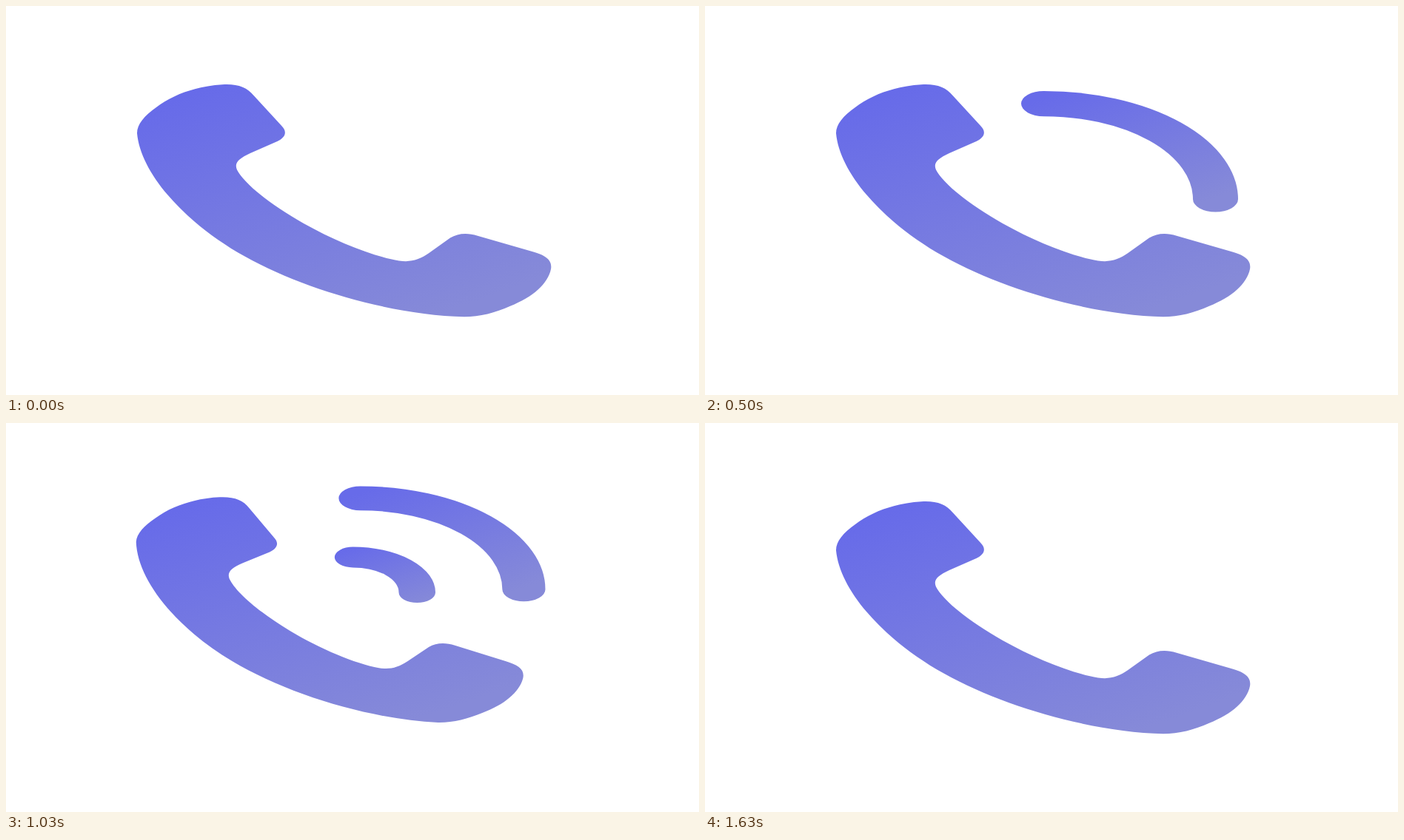
An HTML page that plays this animation: 936x526 px, repeating every 1660 ms.

```html
<!DOCTYPE html>
<html lang="en">
<head>
<meta charset="utf-8">
<title>Ringing phone</title>
<style>
  html, body { margin: 0; width: 100%; height: 100%; overflow: hidden; background: #fff; }
  svg { display: block; width: 100%; height: 100%; }
  .wave { fill: none; stroke-linecap: round; }
</style>
</head>
<body>
<!-- A square drawing, squashed to the stage -->
<svg viewBox="0 0 936 936" preserveAspectRatio="none">
  <defs>
    <linearGradient id="ink" x1=".05" y1=".09" x2=".65" y2="1.04">
      <stop offset="0" stop-color="#676be9"/>
      <stop offset="1" stop-color="#868ad8"/>
    </linearGradient>
    <linearGradient id="outerInk" href="#ink" x1="-.07" y1="-.02" x2=".69" y2="1.18"/>
    <linearGradient id="innerInk" href="#ink" x1="-.21" y1="-.14" x2=".8" y2="1.5"/>
  </defs>
  <g id="icon">
    <path id="phone" fill="url(#ink)" d="M177 306
      C177 285 187 264 203 244 C225 213 257 193 292 189
      C313 187 325 195 335 216 L372 288
      C380 302 378 315 367 325 L330 354
      C314 367 308 378 312 394 C322 428 358 479 402 523
      C446 567 497 603 531 613 C547 617 558 611 571 595
      L600 558 C610 547 623 545 637 553
      L709 590 C730 600 738 612 736 633
      C732 668 712 700 681 722 C661 738 640 748 619 748
      C522 743 404 684 322.500 602.500 C241 521 182 403 177 306Z"/>
    <path id="outer" class="wave" stroke="url(#outerInk)" stroke-width="61" d="M457.500 235A232 230 0 0 1 689.500 465"/>
    <path id="inner" class="wave" stroke="url(#innerInk)" stroke-width="52" d="M504 327A91 89 0 0 1 595 416"/>
  </g>
</svg>
<script>
  const LOOP = 1660, STEPS_PER_MS = 0.03;
  const TILT = 2.23, PIVOT = '345 545';

  // Each ring shrinks the icon steadily, then snaps back to rest.
  const rings = [
    { from: 2, to: 12, side: 1, shrink: 0.00225 },
    { from: 15, to: 33, side: -1, shrink: 0.00297 },
    { from: 35, to: 45, side: -1, shrink: 0.003 }
  ];
  // Waves drift up and to the right; slowdown bends the drift.
  const waves = [
    { id: 'outer', from: 2, to: 33, origin: 15, speed: 2.8, slowdown: 0 },
    { id: 'inner', from: 16, to: 45, origin: 35, speed: 2.81, slowdown: 0.05 }
  ];

  const el = id => document.getElementById(id);
  const during = (span, step) => step >= span.from && step <= span.to;
  // Triangle wave: 0, 1, 0, -1, 0 over 20 steps
  const swing = n => 1 - Math.abs(((n + 5) % 20) / 5 - 2);

  function draw(now) {
    const step = Math.floor((now % LOOP + 4) * STEPS_PER_MS) % 50;
    const ring = rings.find(r => during(r, step));
    const n = ring ? step - ring.from : 0;
    const scale = ring ? 1 - ring.shrink * n : 1;
    const angle = ring ? ring.side * TILT * swing(n) : 0;

    el('icon').setAttribute('transform', `scale(${scale})`);
    el('phone').setAttribute('transform', `rotate(${angle} ${PIVOT})`);
    for (const wave of waves) {
      const k = step - wave.origin;
      const shift = wave.speed * k - wave.slowdown * k * k;
      el(wave.id).setAttribute('transform', `translate(${shift} ${-shift})`);
      el(wave.id).style.display = during(wave, step) ? '' : 'none';
    }
  }

  const start = performance.now();
  function tick() {
    draw(performance.now() - start);
    requestAnimationFrame(tick);
  }
  tick();
</script>
</body>
</html>
```
